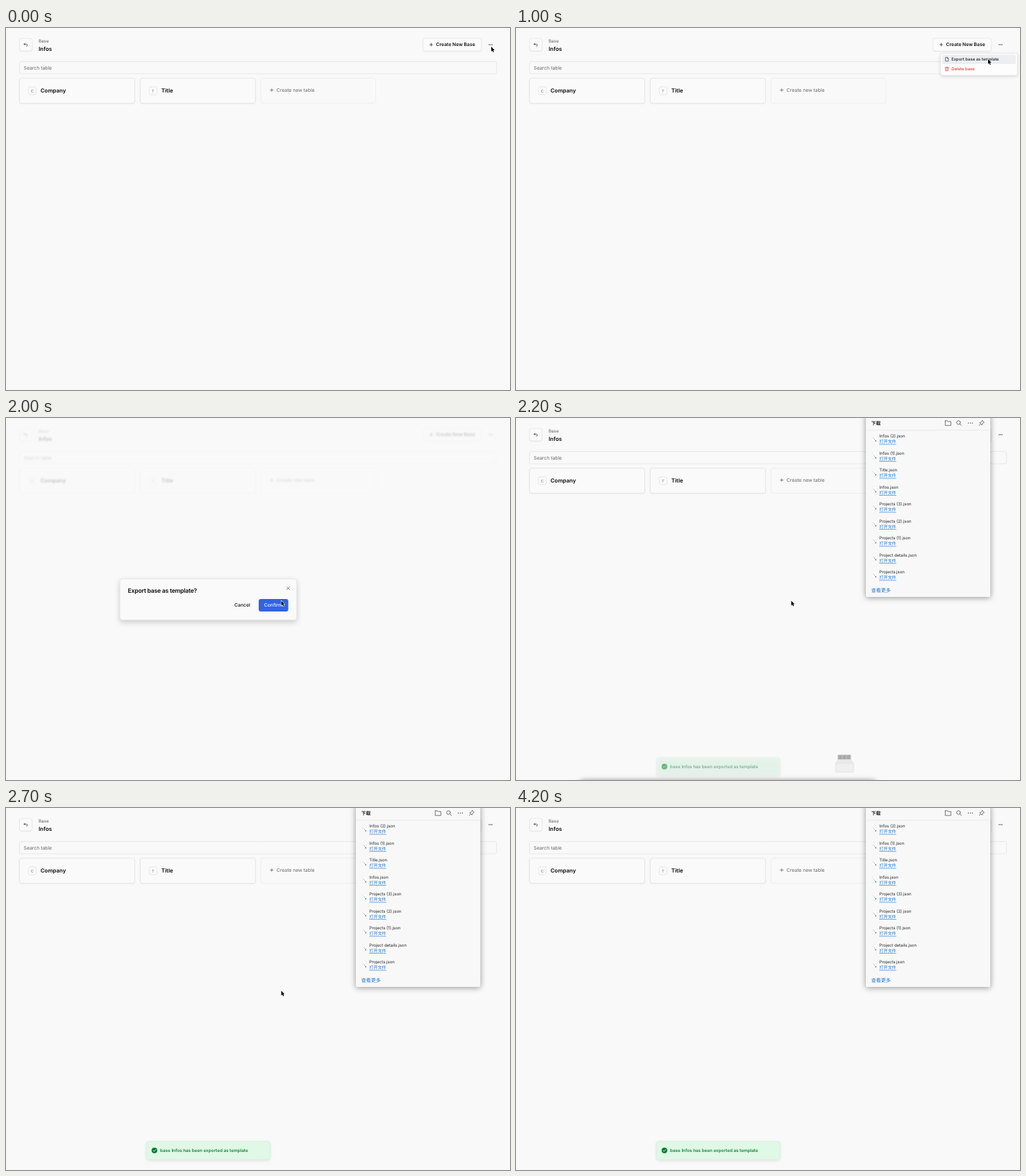
Write an HTML page with a canvas that moves like this. It is 726x522 px and loops after 4.3 s.

```html
<!DOCTYPE html>
<html lang="en">
<head>
<meta charset="utf-8">
<title>Export base as template</title>
<style>
html, body { margin: 0; width: 100%; height: 100%; overflow: hidden; background: #f9f9f9; }
canvas { display: block; width: 726px; height: 522px; }
</style>
</head>
<body>
<canvas id="stage" width="726" height="522"></canvas>
<script>
const LOOP = 4300, STEP = 100, W = 726, H = 522;
const BG = '#f9f9f9', LATIN = 'Inter, sans-serif';
const CJK = '"Noto Sans CJK SC", "Noto Sans CJK", sans-serif';
const stage = document.getElementById('stage').getContext('2d');
const page = Object.assign(document.createElement('canvas'), { width: W, height: H });
let c = stage;

const clamp = v => Math.max(0, Math.min(1, v));
const ramp = (t, a, b) => clamp((t - a) / (b - a));
const smooth = p => p * p * (3 - 2 * p);
const easeOut = p => 1 - (1 - p) ** 3;

function text(s, x, y, size, weight, color, family = LATIN, spacing = 0) {
  c.font = `${weight} ${size}px ${family}`;
  c.textRendering = 'geometricPrecision';
  c.letterSpacing = spacing + 'px';
  c.fillStyle = color;
  c.fillText(s, x, y);
}

function box(x, y, w, h, r, fill, border, shadow) {
  c.beginPath();
  c.roundRect(x, y, w, h, r);
  c.save();
  if (shadow) {
    c.shadowColor = shadow.color;
    c.shadowBlur = shadow.blur;
    c.shadowOffsetY = shadow.dy;
  }
  c.fillStyle = fill;
  c.fill();
  c.restore();
  if (border) {
    c.lineWidth = 0.8;
    c.strokeStyle = border;
    c.stroke();
  }
}

function line(points, color, width = 0.8) {
  c.beginPath();
  points.forEach(([x, y], i) => i ? c.lineTo(x, y) : c.moveTo(x, y));
  c.strokeStyle = color;
  c.lineWidth = width;
  c.lineJoin = c.lineCap = 'round';
  c.stroke();
}

function disc(x, y, r, color) {
  c.beginPath();
  c.arc(x, y, r, 0, 7);
  c.fillStyle = color;
  c.fill();
}

function plus(x, y, r, color) {
  line([[x - r, y], [x + r, y]], color);
  line([[x, y - r], [x, y + r]], color);
}

function dots(x, y, gap, color) {
  for (const k of [-1, 0, 1]) disc(x + k * gap, y, 0.7, color);
}

function faded(alpha, draw) {
  if (alpha <= 0) return;
  c.save();
  c.globalAlpha = alpha;
  draw();
  c.restore();
}

const soft = { color: 'rgba(0,0,0,.09)', blur: 2, dy: 0.7 };

function card(x, letter, name) {
  box(x, 72.3, 166, 36.3, 3, '#fafafa', '#e4e4e5', soft);
  box(x + 12.8, 84.8, 11.4, 11.4, 2.5, '#fafafa', '#e3e3e4');
  c.textAlign = 'center';
  text(letter, x + 18.5, 92.5, 5.6, 400, '#74747a');
  c.textAlign = 'left';
  text(name, x + 30.4, 93.4, 7.9, 600, '#0c0c0e');
}

function drawPage() {
  c.fillStyle = BG;
  c.fillRect(0, 0, W, H);
  box(19.5, 15, 18, 18, 3, '#fafafa', '#e6e6e7', soft);
  line([[27.4, 21.9], [26, 23.3], [27.4, 24.7]], '#222', 0.7);
  c.beginPath();
  c.moveTo(26, 23.3);
  c.lineTo(29.4, 23.3);
  c.arc(29.4, 24.7, 1.4, -Math.PI / 2, Math.PI / 2);
  c.stroke();
  text('Base', 47, 21.2, 6.25, 400, '#5c5c62');
  text('Infos', 46.9, 33, 8, 600, '#0c0c0e');
  box(600.8, 14.8, 84, 18.4, 3, '#fbfbfb', '#e7e7e8', soft);
  plus(612.5, 24, 2, '#333');
  text('Create New Base', 619.5, 26.4, 6.8, 600, '#111114');
  dots(698, 24, 2.1, '#333');
  box(19.4, 48.4, 687.3, 17.6, 2.5, '#f9f9f9', '#e2e2e3');
  text('Search table', 25.6, 59.6, 6.83, 400, '#66666c');
  card(19.4, 'C', 'Company');
  card(193.4, 'T', 'Title');
  box(367.2, 72.3, 165.4, 36.3, 3, '#f9f9f9', '#ebebec');
  plus(382.8, 89.5, 2.2, '#6a6a70');
  text('Create new table', 389.8, 92, 6.83, 400, '#66666c');
}

function drawMenu(hover) {
  box(611.6, 36.4, 110.6, 31.8, 3, '#fdfdfd', '#e6e6e8', { color: 'rgba(0,0,0,.16)', blur: 5, dy: 1.5 });
  if (hover) box(614, 38.6, 106, 13.4, 2, '#eceef2');
  line([[621.2, 42.3], [618.7, 42.3], [618.7, 47.8], [622.8, 47.8], [622.8, 43.9], [621.2, 42.3], [621.2, 43.9], [622.8, 43.9]], '#333', 0.65);
  text('Export base as template', 627.2, 47.2, 5.95, 500, '#1d1d22');
  const red = '#ee3a3a';
  line([[618.1, 57.2], [623.1, 57.2]], red, 0.65);
  line([[619.7, 57.1], [619.9, 56.2], [621.3, 56.2], [621.5, 57.1]], red, 0.65);
  line([[618.7, 57.3], [618.9, 61.8], [622.3, 61.8], [622.5, 57.3]], red, 0.65);
  line([[620, 58.7], [620, 60.5]], red, 0.45);
  line([[621.2, 58.7], [621.2, 60.5]], red, 0.45);
  text('Delete base', 627.2, 61.2, 5.95, 500, red);
}

function drawDialog(hover) {
  box(164, 231.9, 254.8, 59.3, 3.5, '#fafafa', '#e2e2e4', { color: 'rgba(0,0,0,.2)', blur: 8, dy: 3 });
  text('Export base as template?', 175.6, 251.5, 8.6, 600, '#0c0c0e', LATIN, -0.215);
  line([[404.5, 243.6], [408.5, 247.6]], '#55555a', 0.75);
  line([[408.5, 243.6], [404.5, 247.6]], '#55555a', 0.75);
  text('Cancel', 329, 272.4, 6.83, 500, '#111114');
  box(364, 261, 42.6, 18, 3, hover ? '#3163e3' : '#2056df');
  text('Confirm', 371.7, 272.4, 6.83, 500, '#f7f9ff');
}

function drawFile(x, y) {
  c.beginPath();
  c.moveTo(x, y);
  c.lineTo(x + 3.6, y);
  c.lineTo(x + 5.6, y + 2);
  c.lineTo(x + 5.6, y + 8);
  c.lineTo(x, y + 8);
  c.closePath();
  c.fillStyle = '#fff';
  c.fill();
  c.strokeStyle = '#ececec';
  c.lineWidth = 0.5;
  c.stroke();
  line([[x + 0.8, y + 2.2], [x + 2.8, y + 4.4]], '#b9bcb4', 0.8);
  line([[x + 2.6, y + 4.6], [x + 3.8, y + 6]], '#8fc4a0', 0.9);
  disc(x + 4.6, y + 6.9, 0.9, '#3b83c9');
}

const files = ['Infos (2)', 'Infos (1)', 'Title', 'Infos', 'Projects (3)', 'Projects (2)', 'Projects (1)', 'Project details', 'Projects'];

function drawDownloads() {
  const ink = '#4a4a4a', blue = '#1b74c9';
  box(504, -6, 179.2, 264, 2, '#f8f8f8', null, { color: 'rgba(0,0,0,.42)', blur: 8, dy: 1 });
  text('下载', 511.8, 9.8, 6.8, 700, '#222', CJK);
  line([[618.3, 4], [621, 4], [622, 5], [626.4, 5], [626.4, 10.8], [618.3, 10.8], [618.3, 4]], ink, 0.75);
  c.beginPath();
  c.arc(637.4, 6.6, 2.7, 0, 7);
  c.stroke();
  line([[639.4, 8.6], [641.6, 10.8]], ink);
  dots(654.5, 7.2, 2.9, ink);
  line([[671.6, 3.6], [674.4, 6.4], [673.2, 6.9], [671.6, 8.6], [671.2, 10.2], [667.9, 6.8], [669.5, 6.4], [671.1, 4.8], [671.6, 3.6]], ink, 0.75);
  line([[669.4, 8.6], [667.2, 10.8]], ink, 0.75);
  line([[504, 17.6], [683.2, 17.6]], '#e4e4e4', 0.7);
  files.forEach((name, i) => {
    const y = 26 + i * 24.5;
    drawFile(513.6, y);
    text(name + '.json', 523.3, y + 2.2, 6, 400, '#222');
    text('打开文件', 523.5, y + 10.4, 6, 400, blue, CJK);
    line([[523.6, y + 12], [547.4, y + 12]], blue, 0.6);
  });
  text('查看更多', 511.8, 250.9, 7, 500, blue, CJK);
}

function drawToast() {
  box(202.4, 480.8, 177.8, 26.2, 3, '#e0f8e6', '#d5f1dd', { color: 'rgba(0,0,0,.1)', blur: 5, dy: 1.5 });
  disc(213.8, 493.8, 4.1, '#0b7d31');
  line([[212, 493.9], [213.3, 495.2], [215.7, 492.6]], '#e8fbee', 0.9);
  text('base Infos has been exported as template', 222, 496, 6.3, 600, '#14803a');
}

function drawTray() {
  box(463.5, 485.6, 19, 11, 1, '#bdbdbd');
  for (let i = 0; i < 3; i++) box(464.5 + i * 6, 486.4, 4.8, 6, 0.5, '#a9a9a9');
  c.beginPath();
  c.moveTo(459.8, 498);
  c.lineTo(463, 492.2);
  c.lineTo(483, 492.2);
  c.lineTo(486.6, 498);
  c.lineTo(485.6, 511);
  c.lineTo(460.8, 511);
  c.fillStyle = '#e9e9e9';
  c.fill();
  box(460.4, 498, 25.6, 12.8, 1, '#efefef', '#e0e0e0');
}

function drawDockShadow(dy) {
  box(90, 523 + dy, 430, 30, 8, '#999', null, { color: 'rgba(0,0,0,.55)', blur: 7, dy: 0 });
}

const path = [[400, 699, 27], [500, 698, 24], [700, 698, 24], [1000, 680, 45],
  [1150, 680, 45], [1500, 399, 241.5], [1700, 396.5, 263.5]];

function pointer(t) {
  let [, x, y] = path[0];
  for (let i = 1; i < path.length; i++) {
    const p = smooth(ramp(t, path[i - 1][0], path[i][0]));
    x += (path[i][1] - path[i - 1][1]) * p;
    y += (path[i][2] - path[i - 1][2]) * p;
  }
  return [x, y];
}

function drawPointer([x, y]) {
  c.save();
  c.translate(x, y);
  c.beginPath();
  for (const [px, py] of [[0, 0], [0, 7], [1.6, 5.5], [2.7, 8], [3.9, 7.5], [2.8, 5.1], [4.9, 5.1]]) c.lineTo(px, py);
  c.closePath();
  c.lineJoin = 'round';
  c.lineWidth = 1.1;
  c.strokeStyle = '#fff';
  c.stroke();
  c.fillStyle = '#000';
  c.fill();
  c.restore();
}

function render(t) {
  const at = pointer(t);
  const veil = ramp(t, 1100, 1300) * (1 - ramp(t, 2000, 2200));
  c.globalAlpha = 1;
  c.fillStyle = BG;
  c.fillRect(0, 0, W, H);
  c.save();
  if (veil > 0) {
    c.filter = `blur(${1.3 * veil}px)`;
    c.globalAlpha = 1 - 0.78 * veil;
  }
  c.drawImage(page, 0, 0);
  c.restore();

  faded(ramp(t, 500, 700) * (1 - ramp(t, 1100, 1200)), () => drawMenu(at[1] > 38));
  faded(veil, () => {
    const k = 0.95 + 0.05 * veil;
    c.translate(291.5, 261.5);
    c.scale(k, k);
    c.translate(-291.5, -261.5);
    drawDialog(t < 2150 && at[1] > 261);
  });
  if (t >= 2200) {
    const leave = ramp(t, 2300, 2600);
    faded(1 - leave, drawTray);
    if (leave < 1) drawDockShadow(leave * 8);
    drawDownloads();
  }
  const rise = ramp(t, 2100, 2400);
  faded(clamp(rise * 1.6), () => {
    c.translate(0, 30 * (1 - easeOut(rise)));
    drawToast();
  });
  if (t < 3700) drawPointer(at);
}

c = page.getContext('2d');
drawPage();
c = stage;

const start = performance.now();
function tick(now) {
  const t = Math.max(0, now - start) % LOOP;
  render(Math.floor((t + 1) / STEP) * STEP % LOOP);
  requestAnimationFrame(tick);
}
render(0);
requestAnimationFrame(tick);
</script>
</body>
</html>
```
